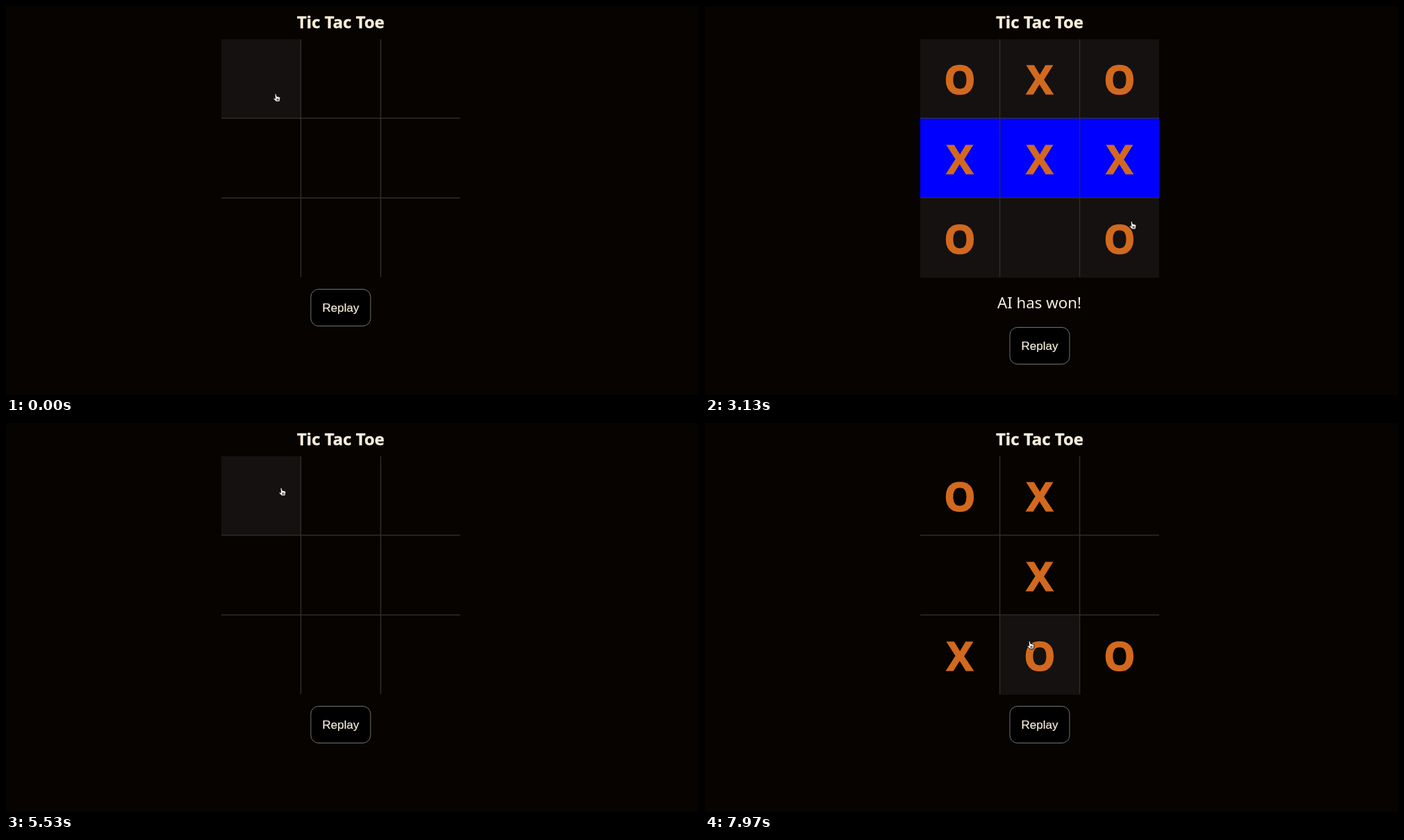
Write an HTML page with a canvas that moves like this. It is 998x561 px and loops after 8000 ms.

```html
<!DOCTYPE html>
<html lang="en">
<head>
<meta charset="utf-8">
<title>Tic Tac Toe</title>
<style>
html, body { margin: 0; width: 100%; height: 100%; overflow: hidden; background: #060301; }
canvas { display: block; }
</style>
</head>
<body>
<canvas id="stage" width="998" height="561"></canvas>
<script>
const ctx = document.getElementById('stage').getContext('2d');
const LOOP = 8000, LEFT = 310, TOP = 48, STEP = 115, CELL = 114, SIZE = 344, MID = 482;
const TRAVEL = 480, PAUSE = 120;
const CREAM = '#f7eddb', ORANGE = '#d2691e', SANS = '"Noto Sans", "Open Sans", sans-serif';

// stops of the pointer; one with a reply is a move, one off the board restarts
const stops = [
  { at: 130, x: 388, y: 127, reply: 4 },
  { at: 950, x: 592, y: 112, reply: 1 },
  { at: 1920, x: 387, y: 321, reply: 3 },
  { at: 2900, x: 614, y: 311, reply: 5 },
  { at: 4600, x: 497, y: 490 },
  { at: 5650, x: 396, y: 94, reply: 4 },
  { at: 6400, x: 592, y: 322, reply: 1 },
  { at: 6990, x: 576, y: 236 },
  { at: 7690, x: 467, y: 315, reply: 6 }
];

const glide = u => u * u * (3 - 2 * u);
const clamp = u => Math.min(1, Math.max(0, u));

function pointerAt(t) {
  let { x, y } = stops[0];
  for (const s of stops.slice(1)) {
    const u = glide(clamp((t - s.at + PAUSE + TRAVEL) / TRAVEL));
    x += (s.x - x) * u;
    y += (s.y - y) * u;
  }
  return { x, y };
}

function cellAt({ x, y }) {
  const col = Math.floor((x - LEFT) / STEP), row = Math.floor((y - TOP) / STEP);
  return col >= 0 && col < 3 && row >= 0 && row < 3 ? row * 3 + col : -1;
}

function boardAt(t) {
  let board = [];
  for (const s of stops.filter(s => s.at <= t)) {
    const cell = cellAt(s);
    if (cell < 0) board = [];
    if (s.reply === undefined) continue;
    board[cell] = 'O';
    board[s.reply] = 'X';
  }
  return board;
}

const cellX = i => LEFT + i % 3 * STEP;
const cellY = i => TOP + Math.floor(i / 3) * STEP;

// weight: extra outline that thickens the letters
function text(str, x, y, font, color, weight = 0) {
  ctx.font = font;
  ctx.fillStyle = ctx.strokeStyle = color;
  ctx.fillText(str, x, y);
  if (weight) {
    ctx.lineWidth = weight;
    ctx.lineJoin = 'miter';
    ctx.miterLimit = 3;
    ctx.strokeText(str, x, y);
  }
}

function drawLines() {
  ctx.fillStyle = '#302c2a';
  for (const k of [1, 2]) {
    ctx.fillRect(LEFT + k * STEP - 1.2, TOP, 1.5, 343);
    ctx.fillRect(LEFT, TOP + k * STEP - 2, SIZE, 1.5);
  }
}

function drawButton(y) {
  ctx.beginPath();
  ctx.roundRect(439, y + 0.5, 86, 53, 11);
  ctx.fillStyle = '#000';
  ctx.fill();
  ctx.strokeStyle = '#77736c';
  ctx.lineWidth = 1;
  ctx.stroke();
  text('Replay', MID, y + 33, '17px "Liberation Sans", Arial, sans-serif', CREAM, 0.2);
}

const HAND = new Path2D('M-1 0Q.2-1.2 1.2 .2L2.2 3.6Q3.3 2.8 4 3.9Q5.2 3.3 5.8 4.4Q7 4.2 7 5.6L6.6 8.2L5.8 11H1.2L-2.6 7.2Q-3.2 5.7-1.8 5.8L-.2 6.6Z');
const FINGERS = new Path2D('M2.4 6.5V9.4M4.1 6.5V9.4');
const ARROW = new Path2D('M0 0V10L2.3 8L4 12L5.7 11.3L4 7.4H7Z');

function drawPointer({ x, y }, hand) {
  ctx.save();
  ctx.translate(x, y);
  ctx.lineJoin = 'round';
  ctx.lineWidth = 1;
  ctx.fillStyle = hand ? '#f4f2ee' : '#080808';
  ctx.strokeStyle = hand ? '#111' : '#e8e6e2';
  if (hand) {
    ctx.fill(HAND);
    ctx.stroke(HAND);
    ctx.stroke(FINGERS);
  } else {
    ctx.fill(ARROW);
    ctx.stroke(ARROW);
  }
  ctx.restore();
}

function draw(t) {
  const board = boardAt(t), pointer = pointerAt(t), hovered = cellAt(pointer);
  const winRow = [0, 1, 2].find(r => [0, 1, 2].every(c => board[r * 3 + c] === 'X'));
  const won = winRow !== undefined;
  const buttonY = won ? 463 : 408;
  const onButton = Math.abs(pointer.x - MID) < 43 && Math.abs(pointer.y - buttonY - 27) < 27;

  ctx.fillStyle = '#060301';
  ctx.fillRect(0, 0, 998, 561);
  ctx.textAlign = 'center';
  text('Tic Tac Toe', MID, 31.5, `bold 24px ${SANS}`, CREAM, 0.4);

  ctx.fillStyle = '#141110';
  for (let i = 0; i < 9; i++) {
    if (won || i === hovered) ctx.fillRect(cellX(i), cellY(i), CELL, CELL);
  }
  if (won) {
    ctx.fillStyle = '#00f';
    ctx.fillRect(LEFT, TOP + winRow * STEP - 1, SIZE + 0.5, STEP);
  }
  drawLines();
  board.forEach((sign, i) =>
    text(sign, cellX(i) + 57, cellY(i) + 79, `bold 57px ${SANS}`, ORANGE, 1.6));

  if (won) text('AI has won!', MID - 0.5, 436, `22.3px ${SANS}`, CREAM);
  drawButton(buttonY);
  drawPointer(pointer, hovered >= 0 || onButton);
}

function tick() {
  draw(performance.now() % LOOP);
  requestAnimationFrame(tick);
}
tick();
</script>
</body>
</html>
```
